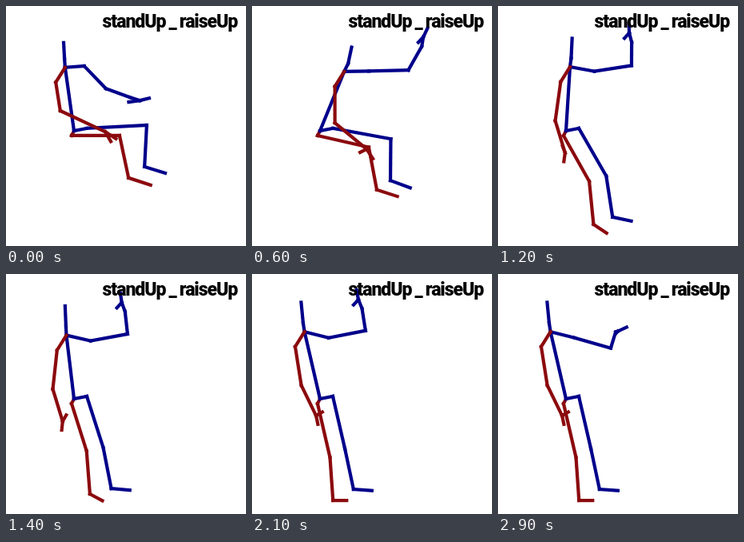
These frames come from a looping animation (300 by 300 pixels, 3000 ms). An HTML page with a canvas:

```html
<!DOCTYPE html>
<html>
<head>
<meta charset="utf-8">
<style>
html, body { margin: 0; width: 100%; height: 100%; overflow: hidden; background: #fff; }
canvas { display: block; width: 300px; height: 300px; }
</style>
</head>
<body>
<canvas id="stage" width="300" height="300"></canvas>
<script>
const ctx = document.getElementById('stage').getContext('2d');
const BLUE = '#00008b', RED = '#8b0a0e';
const LOOP = 3000, STEP = 100;
const PELVIS = [85, 156];

const progress = (t, from, to) => Math.min(1, Math.max(0, (t - from) / (to - from)));
const smooth = (t, from, to) => {
  const u = progress(t, from, to);
  return u * u * (3 - 2 * u);
};
const swell = (t, from, to) => Math.sin(Math.PI * progress(t, from, to));

// Draws one bone at an angle in degrees, clockwise from the right, and returns its far end.
function bone(color, [x, y], angle, length) {
  const a = angle * Math.PI / 180;
  const end = [x + length * Math.cos(a), y + length * Math.sin(a)];
  ctx.strokeStyle = color;
  ctx.beginPath();
  ctx.moveTo(x, y);
  ctx.lineTo(...end);
  ctx.stroke();
  return end;
}

function drawFigure(t) {
  const rise = smooth(t, 250, 1600);
  const reach = Math.sin(Math.PI / 2 * progress(t, 0, 700));
  const extend = swell(t, 0, 700);
  const lower = smooth(t, 400, 950);
  const sway = swell(t, 300, 2000);
  const straighten = smooth(t, 700, 1650);
  const settle = smooth(t, 1400, 2000);
  const drop = smooth(t, 2400, 2900);

  const rightHip = bone(RED, PELVIS, 117, 6.7);
  const rightKnee = bone(RED, rightHip, 77 * rise, 60 + 8 * swell(t, 300, 1500) + 9 * settle);
  const rightAnkle = bone(RED, rightKnee, 78 + 8 * rise, 54);
  bone(RED, rightAnkle, 18 + 26 * swell(t, 600, 2000) - 18 * straighten, 29 - 12 * rise);

  const leftHip = bone(BLUE, PELVIS, -11, 16.3);
  const leftKnee = bone(BLUE, leftHip, -3 + 80 * rise, 75 - 8 * rise);
  const leftAnkle = bone(BLUE, leftKnee, 93 - 15 * rise, 52);
  bone(BLUE, leftAnkle, 17 + 14 * swell(t, 500, 1300) - 13 * rise, 27 - 4 * rise);

  const lean = -8 + 31 * reach - 36 * straighten;
  const chest = bone(BLUE, PELVIS, lean - 90, 80 + 6 * settle);
  const neck = bone(BLUE, chest, lean - 86, 11);
  bone(BLUE, neck, lean / 2 - 89, 20 + 6 * rise);

  const leftShoulder = bone(BLUE, chest, -4 + 18 * rise, 24 + 7 * reach);
  const leftElbow = bone(BLUE, leftShoulder, 46 - 47 * reach - 10 * rise + 27 * drop, 39 + 8 * reach + 6 * extend);
  const leftWrist = bone(BLUE, leftElbow, 20 - 75 * reach - 44 * rise + 26 * drop, 33 + 4 * extend - 5 * rise - 7 * drop);
  const leftPalm = bone(BLUE, leftWrist, 18 - 95 * reach - 35 * rise + 92 * drop, 12 - 9 * drop);
  bone(BLUE, leftPalm, -14 - 45 * reach - 42 * rise + 76 * drop, 12);
  bone(BLUE, leftPalm, 172 - 40 * reach, 14 - 5 * reach - 6 * drop);

  const rightShoulder = bone(RED, chest, 122, 22);
  const rightElbow = bone(RED, rightShoulder, 81 + 17 * sway, 36 + 13 * smooth(t, 200, 800));
  const rightPalm = bone(RED, rightElbow, 25 + 48 * lower - 9 * settle, 62 - 7 * reach - 13 * lower);
  bone(RED, rightPalm, 33 + 45 * lower + 20 * sway, 16 - 5 * lower);
  bone(RED, rightPalm, 60 + 95 * reach + 175 * straighten, 14 - 5 * reach);
}

function drawTitle() {
  ctx.fillStyle = '#000';
  ctx.font = '900 23px Roboto, sans-serif';
  ctx.letterSpacing = '-1px';
  ctx.textAlign = 'center';
  ctx.fillText('standUp', 160, 27);
  ctx.fillText('_', 208, 27);
  ctx.fillText('raiseUp', 253, 27);
}

function draw(t) {
  ctx.fillStyle = '#fff';
  ctx.fillRect(0, 0, 300, 300);
  ctx.lineWidth = 4.2;
  ctx.lineCap = 'square';
  drawFigure(t);
  drawTitle();
}

const start = performance.now();
function tick() {
  const t = (performance.now() - start) % LOOP;
  draw(Math.floor(t / STEP) * STEP);
  requestAnimationFrame(tick);
}
tick();
</script>
</body>
</html>
```
